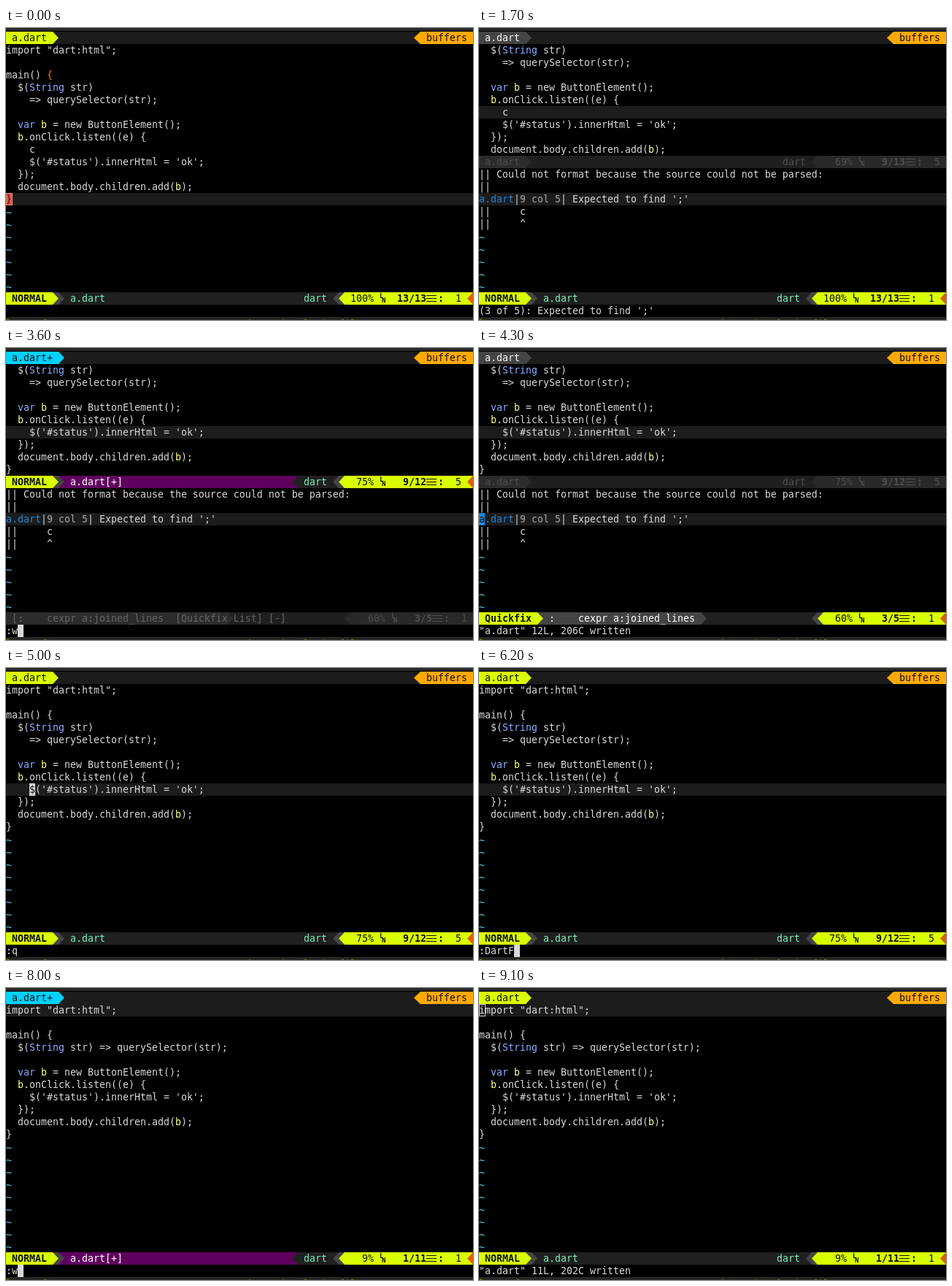
Write an HTML page that moves like this. It is 640 px wide and 400 px high and loops after 9.2 s.

```html
<!DOCTYPE html>
<html lang="en">
<head>
<meta charset="utf-8">
<title>Formatting Dart in Vim</title>
<style>
html, body { margin: 0; width: 100%; height: 100%; overflow: hidden; background: #000; }
#stage {
  position: relative; width: 640px; height: 400px; overflow: hidden;
  background: #000; color: #d8d8d8;
  font: 13.29px/17px "DejaVu Sans Mono", "Noto Sans Mono", monospace;
}
#stage > * { position: absolute; white-space: pre; height: 17px; box-sizing: border-box; }
i { font-style: normal; }
.kw { color: #87afff; }
.id { color: #ffff87; }
.match { color: #ff6a1f; }
.file { color: #1f87d7; }
.pos { color: #a8a8a8; }
.right { clip-path: polygon(0 0, 100% 50%, 0 100%); }
.left { clip-path: polygon(100% 0, 0 50%, 100% 100%); }
.bold { font-weight: bold; }
.tiny { font-size: 9px; line-height: 9px; font-weight: bold; }
</style>
</head>
<body>
<div id="stage"></div>
<script>
const LOOP = 9200, CW = 8, RH = 17, TOP = 5;
const LIME = '#d9ff00', GREY = '#444', DARK = '#1c1c1c', MINT = '#7af0bd',
      INK = '#101018', DIM = '#4e4e4e', BLOCK = '#d8d8d8', ORANGE = '#ffaa08';

const head = ['import "dart:html";', '', 'main() {'];
const split = ['  $(String str)', '    => querySelector(str);'];
const joined = ['  $(String str) => querySelector(str);'];
const open = ['', '  var b = new ButtonElement();', '  b.onClick.listen((e) {'];
const tail = ["    $('#status').innerHtml = 'ok';", '  });', '  document.body.children.add(b);', '}'];
const broken = [...head, ...split, ...open, '    c', ...tail];
const fixed = [...head, ...split, ...open, ...tail];
const tidy = [...head, ...joined, ...open, ...tail];

const errors = [
  '|| Could not format because the source could not be parsed:',
  '||',
  '<i class="file">a.dart</i>|<i class="pos">9 col 5</i>| Expected to find \';\'',
  '||     c',
  '||     ^'
];
const listName = ':    cexpr a:joined_lines';

// Typing a command, one key at a time
const type = (start, text, gap = 100) =>
  [...text].map((_, i) => [start + i * gap, { cmd: text.slice(0, i + 1), typing: true }]);

const steps = [
  [0, { src: broken, line: 13, col: 1, list: false, focus: 'code', stale: false,
        mod: false, cmd: '', typing: false, caret: 'hollow' }],
  ...type(500, ':DartFmt'),
  [1500, { list: true, focus: 'list', stale: true, line: 9, col: 5, typing: false,
           caret: 'none', cmd: "(3 of 5): Expected to find ';'" }],
  [1800, { stale: false, caret: 'block' }],
  [2500, { focus: 'code' }],
  [3200, { src: fixed, mod: true }],
  ...type(3500, ':w'),
  [3800, { mod: false, typing: false, cmd: '"a.dart" 12L, 206C written' }],
  [4200, { focus: 'list' }],
  ...type(4600, ':q'),
  [4900, { list: false, focus: 'code', typing: false }],
  ...type(5700, ':DartFmt'),
  [6700, { src: tidy, line: 1, col: 1, mod: true, typing: false, caret: 'none' }],
  ...type(7700, ':w'),
  [8100, { mod: false, typing: false, caret: 'block', cmd: '"a.dart" 11L, 202C written' }],
  [9000, { caret: 'hollow' }]
];

const stage = document.getElementById('stage');
let out = '';

const rowY = row => TOP + row * RH;
const rect = (x, y, w, h, color) => {
  out += `<div style="left:${x}px;top:${y}px;width:${w}px;height:${h}px;background:${color}"></div>`;
};
const box = (x, row, w, color, cls = '') => {
  out += `<div class="${cls}" style="left:${x}px;top:${rowY(row)}px;width:${w}px;background:${color}"></div>`;
};
const text = (x, row, html, color = '', cls = '', dy = 0) => {
  out += `<span class="${cls}" style="left:${x}px;top:${rowY(row) + dy}px;color:${color}">${html}</span>`;
};
const tint = s => s.replace(/\b(String|var)\b|\bb\b/g, (m, kw) => `<i class="${kw ? 'kw' : 'id'}">${m}</i>`);

function ruler(row, off, line, total, col, color) {
  const ln = 512 + off + (total < 10 ? 8 : 0);
  const pos = `${line}/${total}`;
  text(ln - 40, row, `${Math.floor(100 * line / total)}%`.padStart(4), color);
  text(ln, row, 'L', color, 'tiny', 1);
  text(ln + 3, row, 'N', color, 'tiny', 7);
  text(576 + off - pos.length * CW, row, pos, color, 'bold');
  for (const dy of [4, 8, 12]) rect(576 + off, rowY(row) + dy, 14, 1, color);
  text(592 + off, row, ':', color, 'bold');
  text(616 + off, row, col, color);
}

function activeBar(row, isList, line, total, col, mod) {
  const mode = isList ? 'Quickfix' : 'NORMAL';
  const x = mode.length * CW + 16;
  const end = isList ? x + 24 + listName.length * CW : x + 8;
  const tip = total < 10 ? 464 : 456;
  box(0, row, 640, '#202020');
  if (mod) {
    box(x, row, 400 - x, '#5f005f');
    box(392, row, 8, '#202020', 'left');
  }
  box(x, row, end - x, GREY);
  box(end, row, 8, GREY, 'right');
  box(0, row, x, LIME);
  box(x, row, 8, LIME, 'right');
  text(8, row, mode, INK, 'bold');
  if (isList) text(x + 16, row, listName, '#fff');
  else {
    text(x + 24, row, mod ? 'a.dart[+]' : 'a.dart', mod ? '#fff' : MINT);
    text(408, row, 'dart', MINT);
  }
  box(tip - 8, row, 8, GREY, 'left');
  box(tip, row, 8, GREY);
  box(tip, row, 8, LIME, 'left');
  box(tip + 8, row, 632 - tip, LIME);
  box(632, row, 8, '#df5f00', 'left');
  ruler(row, 0, line, total, col, INK);
}

function idleBar(row, isList, line, total, col) {
  const name = isList ? `[${listName}  [Quickfix List] [-]` : 'a.dart';
  const end = isList ? 304 : 64;
  const tip = total < 10 ? 464 : 456;
  box(0, row, 640, '#1f1f1f');
  box(0, row, end, '#2c2c2c');
  box(end, row, 8, '#2c2c2c', 'right');
  box(tip, row, 8, '#292929', 'left');
  box(tip + 8, row, 632 - tip, '#292929');
  text(8, row, name, isList ? '#666' : DIM);
  if (!isList) text(416, row, 'dart', DIM);
  ruler(row, 8, line, total, col, DIM);
}

function tabs(s) {
  const label = s.mod ? 'a.dart+' : 'a.dart';
  const w = label.length * CW + 16;
  const color = s.focus === 'list' ? GREY : s.mod ? '#00d2ff' : LIME;
  box(0, 0, 640, DARK);
  box(0, 0, w, color);
  box(w, 0, 8, color, 'right');
  text(8, 0, label, s.focus === 'list' ? '#fff' : INK);
  box(559, 0, 9, ORANGE, 'left');
  box(568, 0, 72, ORANGE);
  text(576, 0, 'buffers', INK);
}

function caret(s, row, col, ch) {
  const x = (col - 1) * CW;
  if (s.caret === 'hollow') {
    const brace = ch === '}';
    if (brace) {
      box(x, row, CW, '#e0584c');
      text(x, row, ch, '#3a1410');
    }
    out += `<div style="left:${x}px;top:${rowY(row)}px;width:9px;border:1px solid ${brace ? '#e8846c' : '#c8c8c8'}"></div>`;
  } else if (s.caret === 'block') {
    box(x, row, CW, s.focus === 'list' ? '#1f87d7' : BLOCK);
    text(x, row, ch, '#111');
  }
}

function draw(s) {
  out = '';
  rect(0, 0, 640, 4, '#292927');
  tabs(s);
  const skip = s.list ? 3 : 0;
  const lines = s.src.slice(skip, skip + (s.list ? 9 : 20));
  const total = s.src.length;
  box(0, s.line - skip, 640, DARK);
  lines.forEach((l, i) => {
    let html = tint(l);
    if (s.line === 13 && l === 'main() {') html = 'main() <i class="match">{</i>';
    text(0, i + 1, html);
  });

  let first = lines.length + 1;
  if (s.list) {
    box(0, 13, 640, DARK);
    errors.forEach((l, i) => text(0, 11 + i, l));
    first = 16;
    if (s.focus === 'code') activeBar(10, false, s.line, total, s.col, s.mod);
    else idleBar(10, false, s.line, total, s.col);
  }
  for (let r = first; r < 21; r++) text(0, r, '~', '#55cfdf', '', 2);

  if (s.stale) activeBar(21, false, 13, 13, 1, false);
  else if (s.list && s.focus === 'code') idleBar(21, true, 3, 5, 1);
  else if (s.list) activeBar(21, true, 3, 5, 1, false);
  else activeBar(21, false, s.line, total, s.col, s.mod);

  text(0, 22, s.cmd);
  if (s.typing) box(s.cmd.length * CW, 22, CW, BLOCK);
  else if (s.focus === 'list') caret(s, 13, 1, 'a');
  else caret(s, s.line - skip, s.col, s.src[s.line - 1][s.col - 1]);

  // Terminal line cut off by the bottom edge
  rect(0, 396, 640, 4, '#262624');
  text(0, 23, 'let g:format', '#85851c', '', 1);
  text(320, 23, '"dart vim plugin file"', '#85851c', '', 1);
  stage.innerHTML = out;
}

let shown = -1;
function tick() {
  const t = performance.now() % LOOP;
  let n = 0;
  while (n + 1 < steps.length && steps[n + 1][0] <= t) n++;
  if (n !== shown) {
    shown = n;
    draw(Object.assign({}, ...steps.slice(0, n + 1).map(step => step[1])));
  }
  requestAnimationFrame(tick);
}
tick();
</script>
</body>
</html>
```
